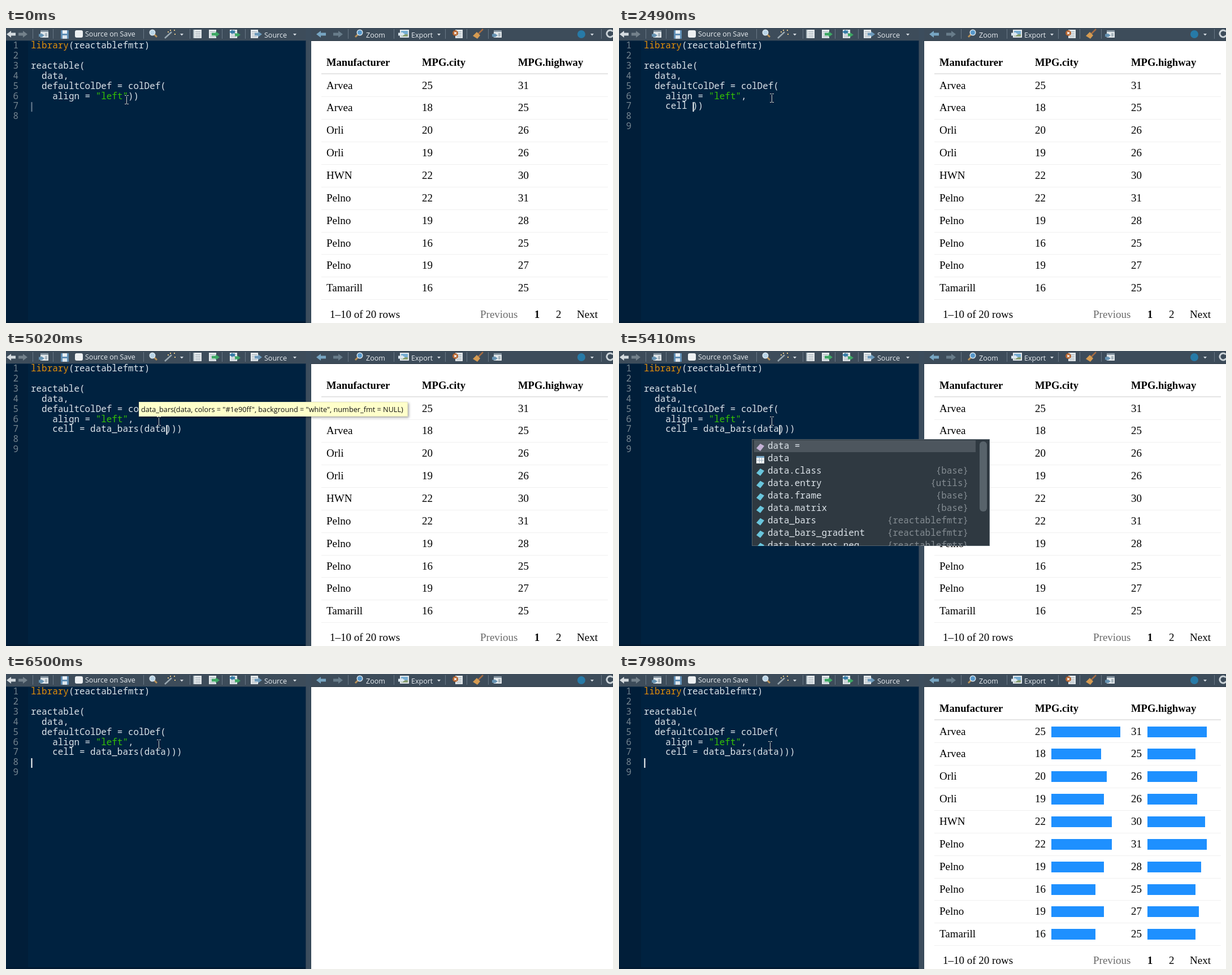
Animation, 1074 px wide and 522 px high, one loop 8 s. Source, as an HTML page with a canvas:

```html
<!DOCTYPE html>
<html lang="en">
<head>
<meta charset="utf-8">
<title>Data bars in a table</title>
<style>
html, body { margin: 0; width: 100%; height: 100%; overflow: hidden; background: #002240; }
canvas { display: block; }
</style>
</head>
<body>
<canvas id="stage" width="1074" height="522"></canvas>
<script>
const ctx = document.getElementById('stage').getContext('2d');
const LOOP = 8000;
const MONO = '300 15.93px "Noto Sans Mono", monospace';
const UI = '12.5px "Open Sans", sans-serif';
const SERIF = '19px "Liberation Serif", serif';
const SERIF_BOLD = 'bold 18.6px "Liberation Serif", serif';
const CHAR = 9.558, CODE_X = 44, LINE = 17.9, TOP = 23.7;
const BAR = '#3d4c5a', INK = '#dde4ea';

const rows = [
  ['Arvea', 25, 31], ['Arvea', 18, 25], ['Orli', 20, 26], ['Orli', 19, 26],
  ['HWN', 22, 30], ['Pelno', 22, 31], ['Pelno', 19, 28], ['Pelno', 16, 25],
  ['Pelno', 19, 27], ['Tamarill', 16, 25]
];

const CALL = 'cell = data_bars(data';
// Typing bursts: start, end, number of characters after each step
const bursts = [
  [1880, 2490, [1, 2, 3, 4, 5]],
  [2810, 3280, [6, 7, 9, 11]],
  [3600, 4160, [12, 13, 14, 15, 16]],
  [4480, 5020, [17, 17, 18, 19, 20, 21]]
];
const pointerPath = [
  [0, 213, 127], [110, 207, 121], [170, 212, 117], [240, 219, 116],
  [640, 234, 118], [720, 257, 121], [800, 270, 124], [7980, 267, 127]
];
const completions = [
  ['data =', ''], ['data', ''], ['data.class', 'base'], ['data.entry', 'utils'],
  ['data.frame', 'base'], ['data.matrix', 'base'], ['data_bars', 'reactablefmtr'],
  ['data_bars_gradient', 'reactablefmtr'], ['data_bars_pos_neg', 'reactablefmtr']
];

function rect(x, y, w, h, color) {
  ctx.fillStyle = color;
  ctx.fillRect(x, y, w, h);
}

function text(str, x, y, font, color, align = 'left') {
  ctx.font = font;
  ctx.fillStyle = color;
  ctx.textAlign = align;
  ctx.fillText(str, x, y);
}

function poly(color, ...pts) {
  ctx.fillStyle = color;
  ctx.beginPath();
  for (let i = 0; i < pts.length; i += 2) ctx.lineTo(pts[i], pts[i + 1]);
  ctx.fill();
}

function line(color, width, x1, y1, x2, y2) {
  ctx.strokeStyle = color;
  ctx.lineWidth = width;
  ctx.beginPath();
  ctx.moveTo(x1, y1);
  ctx.lineTo(x2, y2);
  ctx.stroke();
}

function disc(x, y, r, color) {
  ctx.fillStyle = color;
  ctx.beginPath();
  ctx.arc(x, y, r, 0, Math.PI * 2);
  ctx.fill();
}

function round(x, y, w, h, r, color) {
  ctx.fillStyle = color;
  ctx.beginPath();
  ctx.roundRect(x, y, w, h, r);
  ctx.fill();
}

// Toolbar icons

function arrow(x, y, len, dir, color, half = 6) {
  const tip = dir > 0 ? x + len : x, neck = tip - dir * (half + 2), tail = tip - dir * len;
  poly(color, tip, y, neck, y - half, neck, y - 2.5, tail, y - 2.5,
    tail, y + 2.5, neck, y + 2.5, neck, y + half);
}

const caret = x => poly('#d5dce2', x - 3, 10, x + 3, 10, x, 13.5);
const divider = x => rect(x, 2, 1, 17, '#687785');

function page(x, w = 13) {
  rect(x, 3, w, 15, '#e4e9ec');
  for (let y = 6; y < 17; y += 3) rect(x + 2, y, w - 4, 1, '#a3afb7');
}

function popOut(x) {
  rect(x + 3, 4, 14, 13, '#e3e8eb');
  rect(x + 3, 4, 14, 3, '#8897a3');
  rect(x + 11, 9, 4, 6, '#a9b6be');
  arrow(x, 13, 10, 1, '#6592b2', 4);
}

function magnifier(x, y, flip, color) {
  line('#b89058', 3, x + flip * 2, y + 2, x + flip * 8, y + 8);
  disc(x, y, 5.5, '#dbe7ef');
  disc(x, y, 4, color);
}

function editorToolbar() {
  rect(0, 0, 530, 22, BAR);
  arrow(1, 11, 16, -1, '#d4dade');
  arrow(22, 11, 16, 1, '#74818b');
  [47, 83, 243, 325, 382, 423].forEach(divider);
  popOut(58);
  rect(97, 4, 14, 15, '#608fb6');
  rect(100, 4, 8, 6, '#e8eff5');
  rect(100, 13, 8, 6, '#dce5ed');
  round(122, 4, 14, 13, 3, '#edf0f2');
  text('Source on Save', 140, 15, UI, '#e8edf1');
  magnifier(259, 8, 1, '#b9d4e6');
  line('#99a8b1', 2.5, 281, 18, 293, 7);
  for (const [x, y] of [[290, 3], [297, 3], [298, 10], [286, 6]]) rect(x, y, 2, 2, '#e8c98a');
  caret(311);
  page(333);
  rect(331, 3, 2, 15, '#9caab2');
  page(359);
  arrow(364, 11, 14, 1, '#3da764', 5);
  page(396);
  arrow(395, 7, 10, -1, '#397ea8', 4);
  arrow(405, 12, 10, 1, '#3da764', 4);
  page(433);
  arrow(440, 11, 13, 1, '#6d9abb', 5);
  text('Source', 457, 17, UI, '#e8edf1');
  caret(511);
}

function viewerToolbar(hasPage) {
  rect(540, 0, 534, 22, BAR);
  arrow(549, 11, 17, -1, '#77a5c2');
  arrow(579, 11, 17, 1, '#687c8a');
  if (hasPage) {
    [605, 686, 777, 815, 853].forEach(divider);
    magnifier(626, 8, -1, '#5798cb');
    text('Zoom', 637, 17, UI, '#e8edf1');
    rect(697, 3, 16, 14, '#e4e9ed');
    rect(699, 5, 12, 6, '#76add2');
    rect(699, 11, 12, 4, '#869d70');
    arrow(694, 11, 12, 1, '#dce8f0', 4);
    text('Export', 717, 17, UI, '#e8edf1');
    caret(766);
    page(795);
    disc(795, 9, 5, '#b4622c');
    line('#fff', 1.5, 793, 7, 797, 11);
    line('#fff', 1.5, 797, 7, 793, 11);
    line('#a56c42', 2.5, 844, 2, 836, 10);
    poly('#d59b52', 833, 7, 839, 13, 834, 19, 826, 14);
    popOut(860);
  }
  disc(1018, 11, 7, '#277aa7');
  caret(1037);
  divider(1053);
  ctx.strokeStyle = '#cbd3d8';
  ctx.lineWidth = 3;
  ctx.beginPath();
  ctx.arc(1069, 10, 6, 0.5, 5.6);
  ctx.stroke();
}

// Editor

const lineTop = n => TOP + LINE * (n - 1);
const baseline = n => Math.round(lineTop(n) + 12.3);
const code = (str, col, n, color = INK) =>
  text(str, CODE_X + col * CHAR, baseline(n), MONO, color);

function typedCount(t) {
  let count = 0;
  for (const [start, end, steps] of bursts)
    steps.forEach((n, i) => {
      if (t >= start + (end - start) * i / (steps.length - 1) - 0.5) count = n;
    });
  return count;
}

function caretAt(t, count) {
  if (t < 560) return [7, 0];
  if (t < 1480) return [6, 18];
  if (t < 1560) return [6, 19];
  return t < 5490 ? [7, 4 + count] : [8, 0];
}

const between = (t, a, b) => t >= a && t < b;

function editor(t) {
  const count = typedCount(t), split = t >= 1560;
  rect(0, 22, 530, 500, '#002240');
  rect(0, 22, 39, 500, '#011e39');
  rect(0, 22, 530, 1, '#17314a');
  rect(0, 519, 530, 3, '#011a32');
  for (let n = 1; n <= (split ? 9 : 8); n++)
    text(n, 22, baseline(n), MONO, '#74848f', 'right');
  code('library', 0, 1, '#e48f0a');
  code('(reactablefmtr)', 7, 1);
  code('reactable(', 0, 3);
  code('data,', 2, 4);
  code('defaultColDef = colDef(', 2, 5);
  code('align =', 4, 6);
  code('"left"', 12, 6, '#34c104');
  const comma = t >= 1480 ? ',' : '';
  code(comma + (split ? '' : '))'), 18, 6);
  if (split) code(CALL.slice(0, count) + (count > 16 ? ')))' : '))'), 4, 7);

  const hidden = between(t, 1160, 1480) || between(t, 6040, 6500) || between(t, 7120, 7430);
  if (!hidden) {
    const [n, col] = caretAt(t, count);
    rect(CODE_X + 0.5 + col * CHAR, lineTop(n), 2, 17, t < 560 ? '#6b7f92' : '#fff');
  }
}

// Table

function table(bars) {
  text('Manufacturer', 567, 67, SERIF_BOLD, '#000');
  text('MPG.city', 736, 67, SERIF_BOLD, '#000');
  text('MPG.highway', 906, 67, SERIF_BOLD, '#000');
  rect(558, 80, 507, 2, '#e4e4e4');
  rows.forEach(([name, city, highway], i) => {
    const mid = 102 + i * 39.85, base = Math.round(mid + 5.6);
    text(name, 567, base, SERIF, '#000');
    text(city, 736, base, SERIF, '#000');
    text(highway, 906, base, SERIF, '#000');
    if (bars) {
      const y = Math.round(mid - 9.4);
      rect(765, y, Math.round(city * 4.88), 19, '#1e90ff');
      rect(935, y, Math.round(highway * 3.387), 19, '#1e90ff');
    }
    rect(558, Math.round(mid + 19.4), 507, 1, '#f0f0f0');
  });
  text('1–10 of 20 rows', 573, 513, SERIF, '#000');
  text('Previous', 839, 513, SERIF, '#6b6b6b');
  text('1', 935, 513, SERIF_BOLD, '#000');
  text('2', 973, 513, SERIF, '#000');
  text('Next', 1010, 513, SERIF, '#000');
}

// Overlays

function tooltip() {
  ctx.save();
  ctx.shadowColor = 'rgba(0,0,0,.35)';
  ctx.shadowBlur = 4;
  ctx.shadowOffsetX = ctx.shadowOffsetY = 2;
  rect(235, 90, 476, 26, '#e6e6bc');
  ctx.restore();
  rect(236, 91, 474, 24, '#ffffca');
  text('data_bars(data, colors = "#1e90ff", background = "white", number_fmt = NULL)',
    239, 108, '12.7px "Open Sans", sans-serif', '#111');
}

function popup() {
  ctx.save();
  ctx.beginPath();
  ctx.rect(235, 156, 421, 189);
  ctx.clip();
  rect(235, 156, 421, 189, '#55616a');
  rect(236, 157, 419, 187, '#2f3941');
  rect(239, 158, 392, 21, '#4d565e');
  completions.forEach(([name, pkg], i) => {
    const mid = 168 + i * 21.95, base = Math.round(mid + 5);
    if (i === 1) {
      rect(243, mid - 4, 14, 13, '#f2f5f7');
      rect(243, mid - 4, 14, 3, '#79a9ca');
      rect(244, mid + 3, 12, 1, '#a6b6c1');
      rect(248, mid - 1, 1, 9, '#a6b6c1');
      rect(252, mid - 1, 1, 9, '#a6b6c1');
    } else {
      poly(i ? '#69c5dc' : '#c5b1d6', 243, mid + 4, 250, mid - 4, 257, mid, 250, mid + 9);
    }
    text(name, 263, base, MONO, INK);
    if (pkg) text('{' + pkg + '}', 618, base, MONO, '#848c92', 'right');
  });
  round(638, 160, 13, 124, 6, '#58636b');
  ctx.restore();
}

function pointer(t) {
  const [, x, y] = pointerPath.filter(p => t >= p[0]).pop();
  const c = '#d8cfc5';
  rect(x, y - 6, 1, 13, c);
  for (const edge of [y - 8, y + 7]) {
    rect(x - 3, edge, 3, 1, c);
    rect(x + 1, edge, 3, 1, c);
  }
}

function draw(t) {
  editor(t);
  editorToolbar();
  rect(530, 0, 10, 522, '#3c4d5d');
  rect(530, 22, 1, 500, '#24394d');
  rect(539, 22, 1, 500, '#2c3f50');
  rect(540, 22, 534, 500, '#fff');
  rect(540, 22, 534, 1, '#26333f');
  viewerToolbar(!between(t, 5810, 6420));
  if (!between(t, 6420, 7120)) table(t >= 7120);
  if (between(t, 4588, 5410)) tooltip();
  if (between(t, 5410, 5490)) popup();
  pointer(t);
}

function frame() {
  draw(performance.now() % LOOP);
  requestAnimationFrame(frame);
}
frame();
</script>
</body>
</html>
```
